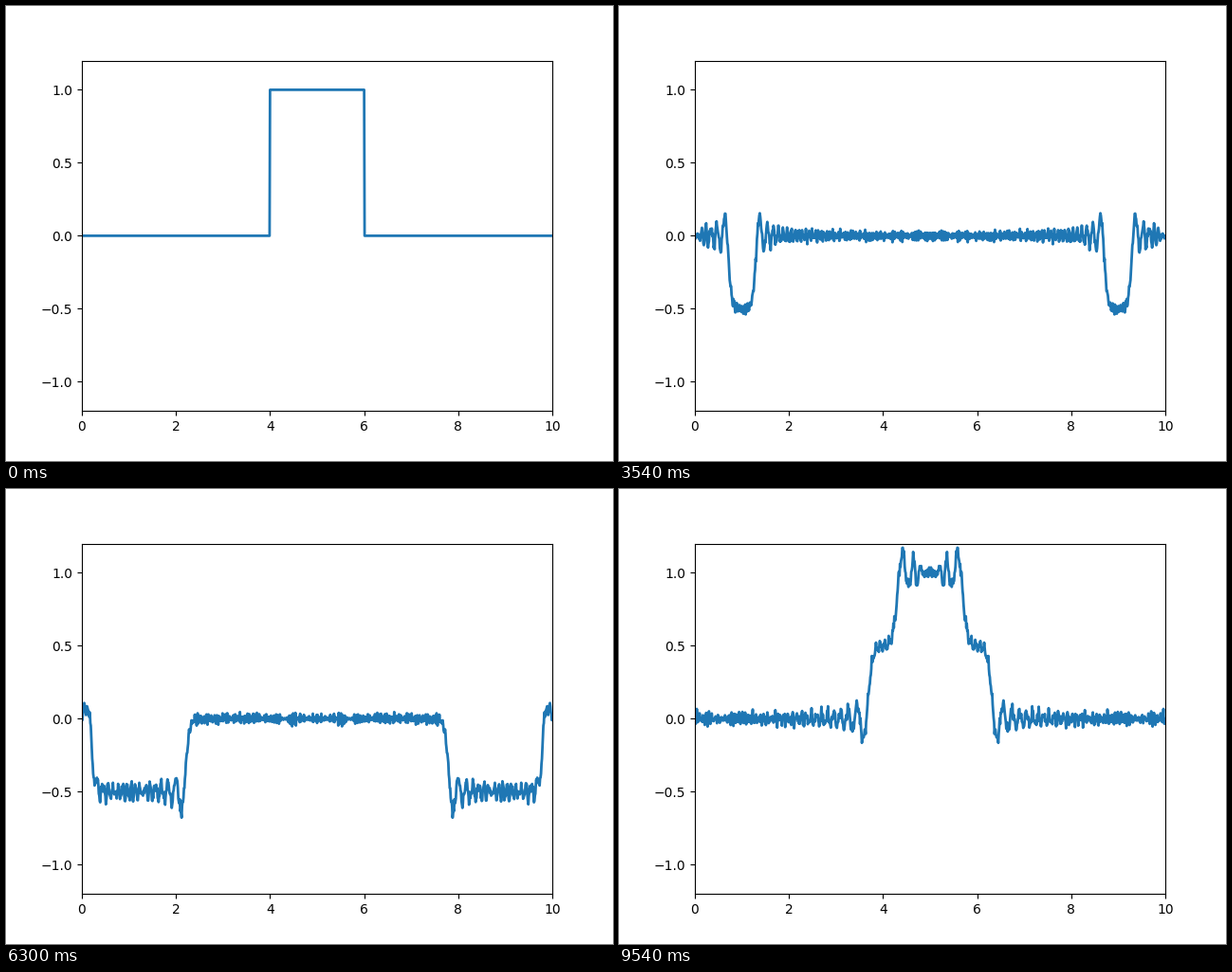
These frames come from a looping animation (640x480 px, 9.6 s). A matplotlib script:

```python
import numpy as np
import matplotlib.pyplot as plt
from matplotlib.animation import FuncAnimation

LENGTH = 10.0
POINTS = 1001
COURANT = 0.5
STEPS_PER_FRAME = 50
FRAMES = 160
INTERVAL = 60

x = np.linspace(0, LENGTH, POINTS)


def solve_wave():
    """Leapfrog solution of the wave equation with fixed ends, one row per frame."""
    r2 = COURANT ** 2
    u = np.where((x >= 4) & (x <= 6), 1.0, 0.0)
    rows = [u]

    # start at rest: the first step takes half the acceleration
    prev = u.copy()
    prev[1:-1] += 0.5 * r2 * (u[2:] - 2 * u[1:-1] + u[:-2])

    for _ in range(FRAMES - 1):
        for _ in range(STEPS_PER_FRAME):
            new = np.zeros_like(u)
            new[1:-1] = (2 * u[1:-1] - prev[1:-1]
                         + r2 * (u[2:] - 2 * u[1:-1] + u[:-2]))
            prev, u = u, new
        rows.append(u)
    return rows


history = solve_wave()

fig, ax = plt.subplots(figsize=(6.4, 4.8), dpi=100)
ax.set_xlim(0, LENGTH)
ax.set_ylim(-1.2, 1.2)
line, = ax.plot(x, history[0], lw=2)


def update(frame):
    line.set_ydata(history[frame])
    return line,


anim = FuncAnimation(fig, update, frames=FRAMES, interval=INTERVAL,
                     repeat=True, repeat_delay=0)
plt.show()
```
